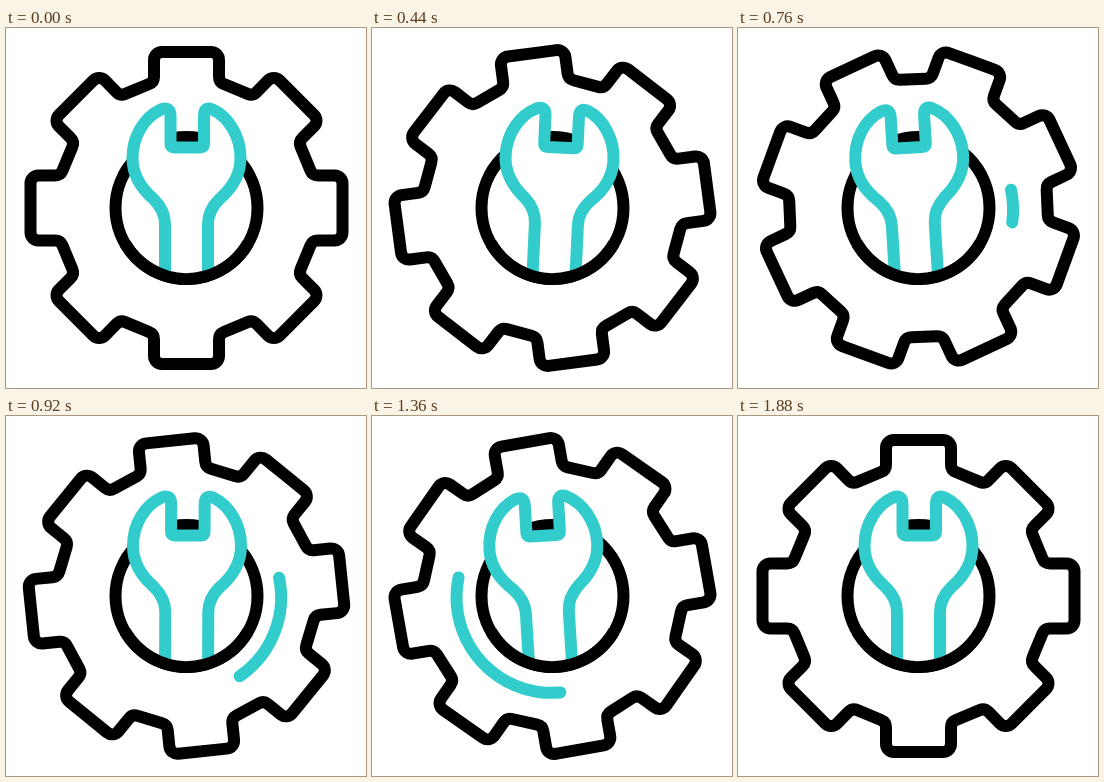
Write an HTML page with a canvas that moves like this. It is 360x360 px and loops after 2440 ms.

```html
<!DOCTYPE html>
<html lang="en">
<head>
<meta charset="utf-8">
<title>Gear and wrench</title>
<style>
  html, body { margin: 0; width: 100%; height: 100%; overflow: hidden; background: #fff; }
  canvas { display: block; width: 360px; height: 360px; }
</style>
</head>
<body>
<canvas id="stage"></canvas>
<script>
const LOOP = 2440, STEP = 40, END = 1880;
const BLACK = '#000', TEAL = '#33cccc';
const CX = 180.5, CY = 180, PIVOT_Y = 280;
const RAD = Math.PI / 180;

// Motion tables: [time in ms, angle in degrees]
const gearTurn = [[0, 0], [320, -11], [440, -7.5], [760, 20], [1080, 58], [1360, 80], [1560, 88], [1880, 90]];
const wrenchTurn = [[100, 0], [430, 2.7], [730, -3.7], [1030, 1.9], [1330, -3.7], [1610, 2.3], [1880, 0]];
const arcHead = [[600, -12], [1444, 198]];
const arcTail = [[919, -12], [1849, 198]];

const canvas = document.getElementById('stage');
const ctx = canvas.getContext('2d');
const ratio = window.devicePixelRatio || 1;
canvas.width = canvas.height = 360 * ratio;

// Slope at a key: flat at the ends and at turning points
function slope(keys, i) {
  if (i === 0 || i === keys.length - 1) return 0;
  const [a, b, c] = keys.slice(i - 1, i + 2);
  const before = (b[1] - a[1]) / (b[0] - a[0]);
  const after = (c[1] - b[1]) / (c[0] - b[0]);
  return before * after <= 0 ? 0 : (c[1] - a[1]) / (c[0] - a[0]);
}

function valueAt(keys, t) {
  const last = keys.length - 1;
  if (t <= keys[0][0]) return keys[0][1];
  if (t >= keys[last][0]) return keys[last][1];
  const i = keys.findIndex(k => k[0] > t) - 1;
  const [t0, v0] = keys[i], [t1, v1] = keys[i + 1];
  const d = t1 - t0, u = (t - t0) / d, w = 1 - u;
  return v0 * w * w * (1 + 2 * u) + v1 * u * u * (3 - 2 * u)
    + d * u * w * (slope(keys, i) * w - slope(keys, i + 1) * u);
}

function makeGear() {
  const tooth = [[-32.5, -126], [-32.5, -156], [32.5, -156], [32.5, -126]];
  const points = [];
  for (let k = 0; k < 8; k++) {
    const c = Math.cos(k * 45 * RAD), s = Math.sin(k * 45 * RAD);
    for (const [x, y] of tooth) points.push([x * c - y * s, x * s + y * c]);
  }
  const path = new Path2D();
  path.moveTo(0, -156);
  for (let i = 2; i < points.length + 2; i++) {
    const p = points[i % points.length], q = points[(i + 1) % points.length];
    path.arcTo(...p, ...q, 8);
  }
  path.closePath();
  return path;
}

const gear = makeGear();
const wrench = new Path2D(`M-21.5 247 V196 C-21.5 185 -26 178 -33 171
  C-47 159 -54 146 -54 130 C-54 108 -42 89 -25.5 81.5 Q-16 78 -16 88
  V116 Q-16 119.5 -12.5 119.5 H14 Q17.5 119.5 17.5 116
  V88 Q17.5 78 26 81.5 C42 89 54 108 54 130
  C54 146 47 159 33 171 C26 178 21.5 185 21.5 196 V247`);

function arc(x, y, r, from, to, color) {
  ctx.strokeStyle = color;
  ctx.beginPath();
  ctx.arc(x, y, r, from * RAD, to * RAD);
  ctx.stroke();
}

function turned(x, y, degrees, draw) {
  ctx.save();
  ctx.translate(x, y);
  ctx.rotate(degrees * RAD);
  draw();
  ctx.restore();
}

function render(t) {
  ctx.setTransform(ratio, 0, 0, ratio, 0, 0);
  ctx.fillStyle = '#fff';
  ctx.fillRect(0, 0, 360, 360);
  ctx.lineWidth = 12;
  ctx.lineJoin = 'round';
  ctx.lineCap = 'butt';

  turned(CX, CY, valueAt(gearTurn, t), () => {
    ctx.strokeStyle = BLACK;
    ctx.stroke(gear);
  });
  arc(CX, CY, 71, 0, 360, BLACK);

  turned(CX, PIVOT_Y, valueAt(wrenchTurn, t), () => {
    ctx.translate(0, -PIVOT_Y);
    ctx.fill(wrench);
    ctx.strokeStyle = TEAL;
    ctx.stroke(wrench);
  });
  // The ring passes in front of the handle
  arc(CX, CY, 71, 30, 150, BLACK);

  const head = valueAt(arcHead, t), tail = valueAt(arcTail, t);
  if (head - tail > 0.05) {
    ctx.lineCap = 'round';
    arc(179.8, 181.5, 95.3, tail, head, TEAL);
  }
}

const start = performance.now();
function tick() {
  const t = (performance.now() - start) % LOOP;
  render(Math.min(END, Math.floor(t / STEP) * STEP));
  requestAnimationFrame(tick);
}
tick();
</script>
</body>
</html>
```
